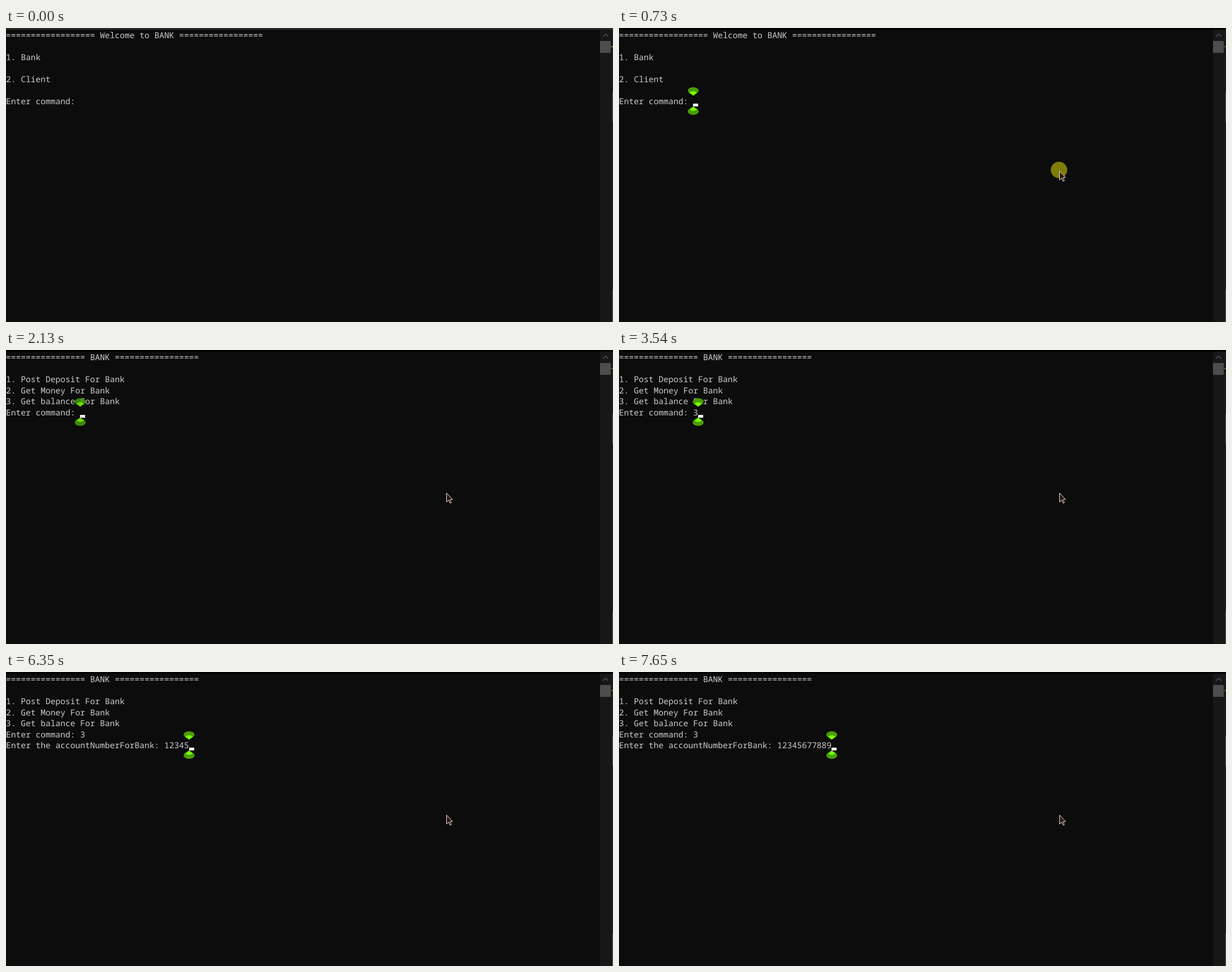
Recreate the animation shown at these times as an HTML page. Size 1074 by 521 pixels, loop 7990 ms.

```html
<!DOCTYPE html>
<html lang="en">
<head>
<meta charset="utf-8">
<title>Terminal session</title>
<style>
  html, body { margin: 0; width: 100%; height: 100%; overflow: hidden; background: #0c0c0c; }
  #stage { position: relative; width: 1074px; height: 521px; overflow: hidden; background: #0c0c0c; }
  #text {
    position: absolute; left: 0; top: 4px; margin: 0; color: #ccc;
    font: 500 14.59px/19.5px "Noto Sans Mono", "DejaVu Sans Mono", monospace;
    font-variant-ligatures: none; text-rendering: geometricPrecision;
  }
  svg { position: absolute; left: 0; top: 0; }
</style>
</head>
<body>
<div id="stage">
  <pre id="text"></pre>
  <svg width="1074" height="521" viewBox="0 0 1074 521">
    <defs>
      <g id="lobe">
        <ellipse cy="-18.4" rx="9.7" ry="6.1" fill="#4a9e08"/>
        <path d="M-6.6-14.6Q-4-17.6 0-17.6T6.6-14.6L0-9.5Z" fill="#78ff00"/>
      </g>
    </defs>
    <rect id="bar" width="1074" height="3"/>
    <rect x="1051" y="3" width="20" height="518" fill="#171717"/>
    <path d="M1056.5 15.5l4.5-4.5 4.5 4.5" fill="none" stroke="#55556a" stroke-width="1.4"/>
    <rect x="1051" y="23" width="19" height="21" fill="#4d4d4d"/>
    <rect x="1072" y="3" width="1" height="518" fill="#333"/>
    <path d="M1073.5 113V166M1073.5 463V521" stroke="#4a4a4a"/>
    <rect id="tick" x="1071" y="32" width="3" height="2"/>
    <g id="mark">
      <use href="#lobe"/>
      <use href="#lobe" transform="scale(1 -1)"/>
    </g>
    <rect id="caret" width="9" height="5" fill="#f2f2f2"/>
    <circle id="click" cx="778.5" cy="251.5" r="14.5" fill="#ff0" fill-opacity=".47"/>
    <path id="pointer" d="M.5.5V16.5L4.2 13 6.7 18.5 9 17.5 6.6 12H11.2Z"
          fill="#2a1814" stroke="#f0e0da"/>
  </svg>
</div>
<script>
const LOOP = 7990, CELL = 8.755, ROW = 19.5, TOP = 3;
const $ = id => document.getElementById(id);
const rule = n => "=".repeat(n);

const home = `${rule(18)} Welcome to BANK ${rule(17)}\n\n1. Bank\n\n2. Client\n\nEnter command: `;
const menu = `${rule(16)} BANK ${rule(17)}\n\n1. Post Deposit For Bank\n` +
  "2. Get Money For Bank\n3. Get balance For Bank\nEnter command: ";
const account = menu + "3\nEnter the accountNumberForBank: ";

// time, screen, typed text, caret shown, marker opacity
const steps = [
  [0, home, "", 0, 0],
  [730, home, "", 1, 1],
  [1230, home, "", 0, 1],
  [1670, home, "1", 1, 1],
  [1750, home, "1", 0, 1],
  [2060, home, "1\n", 1, 0],
  [2090, menu, "", 1, 0],
  [2130, menu, "", 1, .85],
  [2790, menu, "", 0, .85],
  [3280, menu, "", 1, .85],
  [3520, menu, "3", 1, 1],
  [3820, menu, "3", 0, 1],
  [4090, account, "", 1, 1],
  [4860, account, "", 0, 1],
  [5380, account, "", 1, 1],
  [5770, account, "1", 1, 1],
  [5900, account, "12", 1, 1],
  [6050, account, "123", 1, 1],
  [6230, account, "1234", 1, 1],
  [6350, account, "12345", 1, 1],
  [6410, account, "12345", 0, 1],
  [6530, account, "123456", 1, 1],
  [6710, account, "1234567", 1, 1],
  [6940, account, "1234567", 0, 1],
  [7120, account, "123456778", 1, 1],
  [7460, account, "123456778", 0, 1],
  [7540, account, "1234567788", 1, 1],
  [7650, account, "12345677889", 1, 1]
];

const place = (el, x, y) => el.setAttribute("transform", `translate(${x} ${y})`);
const show = (el, on) => el.setAttribute("opacity", +on);
let current;

function setStep(step) {
  if (step === current) return;
  current = step;
  const [, screen, typed, caretOn, markOpacity] = step;
  const lines = (screen + typed).split("\n");
  const row = lines.length - 1;
  const x = lines[row].length * CELL;
  $("text").textContent = screen + typed;
  place($("caret"), Math.round(x), Math.floor(TOP + (row + 1) * ROW - 5));
  show($("caret"), caretOn);
  place($("mark"), x, 12.5 + row * ROW);
  show($("mark"), markOpacity);
}

function movePointer(t) {
  const left = 1 - Math.min(1, Math.max(0, (t - 240) / 310));
  const x = 779 + 223 * left ** 2;
  const y = 253 + 255 * left ** 1.68;
  place($("pointer"), Math.round(x), Math.round(y));
  show($("pointer"), t >= 240);
}

function draw(t) {
  setStep(steps.findLast(s => s[0] <= t));
  movePointer(t);
  show($("click"), t >= 710 && t < 920);
  const focused = t >= 730;
  $("bar").setAttribute("fill", focused ? "#000" : "#2b2b2b");
  $("tick").setAttribute("fill", focused ? "#6b6a1a" : "#c87a3a");
}

const start = performance.now();
function tick(now) {
  draw(Math.max(0, now - start) % LOOP);
  requestAnimationFrame(tick);
}
draw(0);
requestAnimationFrame(tick);
</script>
</body>
</html>
```
